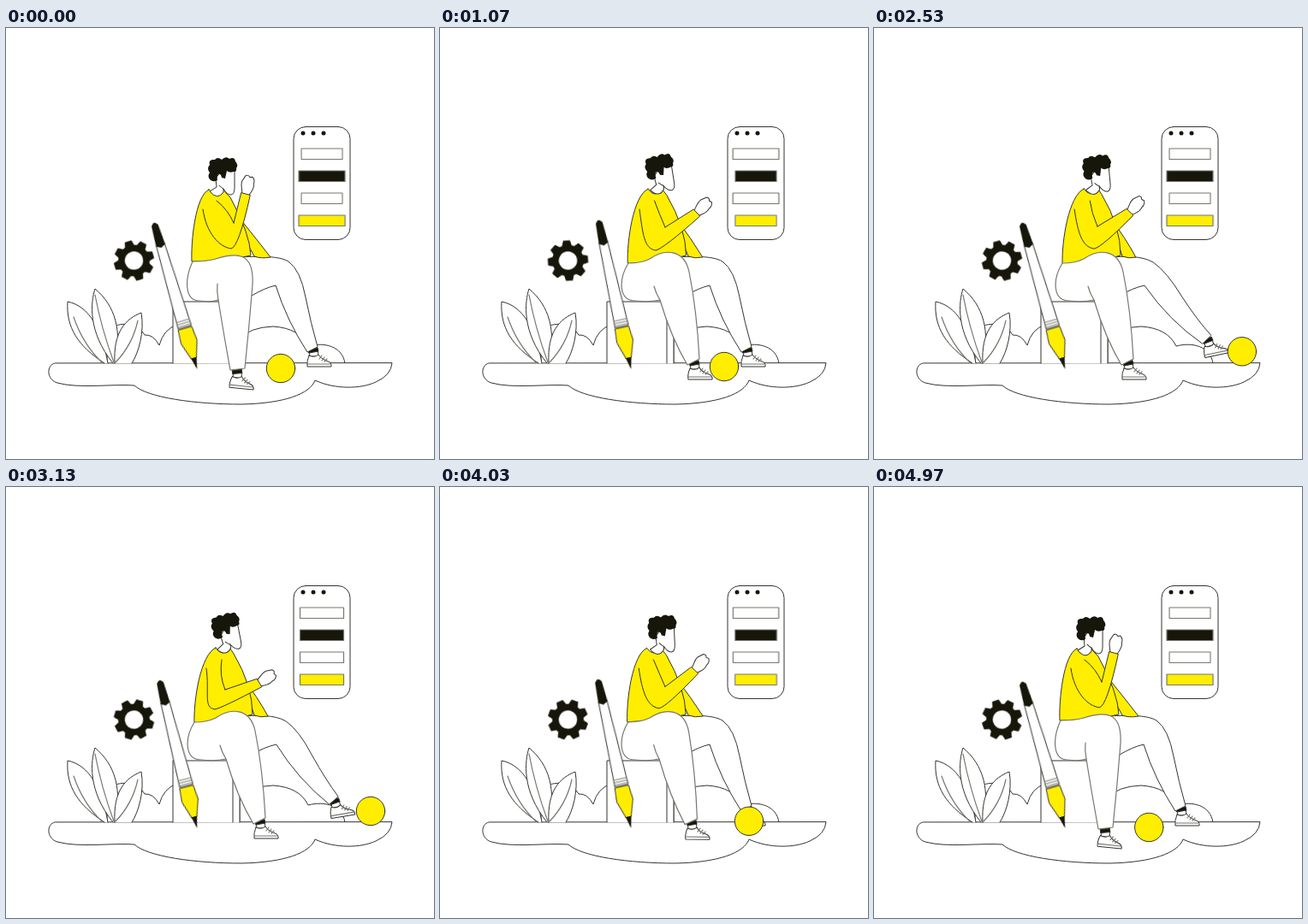
Write an HTML page that moves like this. It is 500 px wide and 504 px high and loops after 5.01 s.

```html
<!DOCTYPE html>
<html lang="en">
<head>
<meta charset="utf-8">
<title>Sitting figure with phone, pencil and ball</title>
<style>
  html, body { margin: 0; width: 100%; height: 100%; overflow: hidden; background: #fff; }
  svg { display: block; width: 500px; height: 504px; }
  .line { fill: #fff; stroke: #333331; stroke-width: 1; stroke-linejoin: round; stroke-linecap: round; }
  .soft { stroke: #77776f; stroke-width: 1.2; }
  .open { fill: none; }
  .yellow { fill: #ffee00; }
  .dark { fill: #17160a; }
  .bar { transform-origin: 369px 0; animation: swell 1252.5ms cubic-bezier(.37, 0, .63, 1) infinite alternate; }
  .bar.wide { animation-direction: alternate-reverse; }
  #pencil { animation: sway 1252.5ms cubic-bezier(.37, 0, .63, 1) infinite alternate; }
  #gear { animation: turn 5010ms linear infinite; }
  @keyframes swell { from { transform: scaleX(.94); } to { transform: scaleX(1.06); } }
  @keyframes sway {
    from { transform: translate(223px, 398px) rotate(-16.4deg); }
    to { transform: translate(223px, 398px) rotate(-12.1deg); }
  }
  @keyframes turn {
    from { transform: translate(149.5px, 272px) rotate(28deg); }
    to { transform: translate(149.5px, 272px) rotate(298deg); }
  }
</style>
</head>
<body>
<svg viewBox="0 0 500 504">
  <!-- bushes and ground -->
  <path class="line" d="M118 392V354C128 344 152 342 162 359Q172 358 179 371Q184 352 200 347V392"/>
  <path class="line" d="M273 392V364Q284 350 312 349Q343 351 353 372C372 367 393 372 396 392"/>
  <path class="line" d="M57 392C47 394 47 411 60 415C85 422 125 416 150 418C165 432 220 440 275 440C325 439 355 428 361 412C385 423 415 422 432 414Q450 406 451 392Z"/>

  <!-- plant -->
  <g class="line">
    <path d="M115 392C84 372 70 350 72 320C97 325 112 352 119 392"/>
    <path class="soft open" d="M79 338Q90 370 112 391"/>
    <path d="M125 392C95 355 99 320 104 305C128 325 136 355 127 392"/>
    <path class="soft open" d="M104 312Q111 350 126 391"/>
    <path d="M127 392C125 355 140 340 158 333C162 355 155 380 147 392"/>
    <path class="soft open" d="M154 342Q148 370 128 391"/>
  </g>

  <!-- seat -->
  <path class="line" d="M195 392V320H273V392M265 320V392"/>

  <g id="gear">
    <circle r="14.5" fill="none" stroke="#17160a" stroke-width="7.6"/>
  </g>

  <g id="pencil">
    <path class="line" d="M-5 -151L-8 -50H8L5 -151Z"/>
    <path class="dark" d="M-4 -174Q0 -181 4 -174L5.500 -150L0 -147L-5.500 -150Z"/>
    <path class="line soft open" d="M-7.500 -58H7.500M-7.800 -55H7.800M-8 -52H8"/>
    <path class="line yellow" d="M-8 -49H8L9.500 -32L3 -12H-3L-9.500 -32Z"/>
    <path class="dark" d="M-3.400 -13H3.400L0 1Z"/>
  </g>

  <!-- phone -->
  <rect class="line" x="336" y="115.500" width="66" height="132" rx="14"/>
  <g class="dark">
    <circle cx="347" cy="123" r="2.500"/>
    <circle cx="359" cy="123" r="2.500"/>
    <circle cx="371" cy="123" r="2.500"/>
  </g>
  <g class="line soft">
    <rect class="bar" x="343.500" y="141" width="51" height="12.500"/>
    <rect class="bar wide dark" x="343.500" y="167" width="51" height="12.500"/>
    <rect class="bar" x="343.500" y="193" width="51" height="12.500"/>
    <rect class="bar wide yellow" x="343.500" y="219" width="51" height="12.500"/>
  </g>

  <!-- figure -->
  <defs>
    <g id="shoe" class="line">
      <path d="M-5 -2L-4 7H6L5 -3Z"/>
      <path class="dark" d="M-6 -1L5 -3L6 1L-5 3Z"/>
      <path d="M-5 6Q-8 13 -7 19H21Q22 14 15 12Q9 10 6 5Q1 9 -5 6Z"/>
      <path class="soft open" d="M-7 16H20M7 10L10 6M10 12L13 8M13 13L16 10"/>
    </g>
  </defs>
  <use id="farShoe" href="#shoe"/>
  <path id="farLeg" class="line"/>
  <path id="farArm" class="line yellow"/>
  <path id="torso" class="line yellow"/>
  <use id="nearShoe" href="#shoe"/>
  <path id="nearLeg" class="line soft"/>
  <path id="crease" class="line soft open"/>
  <g id="head">
    <path class="line" d="M245 176L246 186L238 191Q247 202 254 192V188Q258 195 263 195Q267 194 267 187V167L254 165Z"/>
    <path class="line open" d="M249 184Q252 187 254 188"/>
    <path class="dark" d="M238 177Q235 173 238 169Q234 164 238 160Q236 153 244 154Q247 150 252 154Q257 149 261 153Q267 150 268 156Q272 160 269 164Q270 168 266 168Q261 170 258 167L256 176L252 175Q251 170 248 171Q246 173 247 178Q242 181 238 177Z"/>
  </g>
  <g id="hand"><path class="line" d="M-1 -4C5 -5 8 -8 14 -7L21 -4Q23 -1 20 1L21 4Q18 8 13 7C8 9 4 6 -1 4"/></g>
  <path id="arm" class="line yellow"/>
  <path id="armpit" class="line open"/>
  <circle id="ball" class="line yellow" r="16.700"/>
</svg>

<script>
const LOOP = 5010;
const POSES = [0, 1070, 1930, 3130, 3570, 4430];
const el = id => document.getElementById(id);
const set = (id, name, value) => el(id).setAttribute(name, value);

const gear = el('gear');
for (let i = 0; i < 8; i++) {
  const tooth = document.createElementNS('http://www.w3.org/2000/svg', 'path');
  tooth.setAttribute('d', 'M-6 -16L-4 -23.500H4L6 -16Z');
  tooth.setAttribute('class', 'dark');
  tooth.setAttribute('transform', `rotate(${i * 45})`);
  gear.append(tooth);
}

// Smooth closed curve through values at the given times
function spline(values, t, times = POSES) {
  const n = times.length;
  const time = i => times[(i + n) % n] + Math.floor(i / n) * LOOP;
  const val = i => values[(i + n) % n];
  const slope = i => (val(i + 1) - val(i - 1)) / (time(i + 1) - time(i - 1));
  let i = n - 1;
  while (times[i] > t) i--;
  const h = time(i + 1) - time(i), u = (t - time(i)) / h;
  const u2 = u * u, u3 = u2 * u;
  return (2 * u3 - 3 * u2 + 1) * val(i) + (u3 - 2 * u2 + u) * h * slope(i)
    + (3 * u2 - 2 * u3) * val(i + 1) + (u3 - u2) * h * slope(i + 1);
}

function ease(t, from, to) {
  const u = Math.min(1, Math.max(0, (t - from) / (to - from)));
  return (1 - Math.cos(Math.PI * u)) / 2;
}

// Blend two paths of the same structure
function morph(a, b, k) {
  const num = /-?\d+(\.\d+)?/g, ends = b.match(num);
  let i = 0;
  return a.replace(num, s => (+s + (ends[i++] - s) * k).toFixed(2));
}

const SHAPES = {
  torso: ['M237 189C221 196 216 250 217 273Q262 272 286 266Q285 240 262 198Q256 192 254 189Q246 200 237 189Z',
          'M245 188C227 196 219 250 220 276Q262 274 288 266Q288 232 266 195Q263 190 261 188Q253 200 245 188Z'],
  farArm: ['M275 225Q292 246 309 268Q298 270 290 267Q282 250 272 237Z',
           'M276 222Q294 246 306 268Q298 270 290 267Q286 252 280 240Z'],
  nearLeg: ['M218 273C208 295 209 319 226 319Q240 321 248 318Q253 350 262 400L279 398Q284 350 288 300C290 262 270 262 245 270Q235 273 218 273Z',
            'M220 275C208 295 209 319 228 319Q244 321 257 318Q270 362 289 394L303 387Q300 330 291 285C285 258 262 258 245 270Q235 275 220 275Z'],
  crease: ['M248 318Q246 308 247 299', 'M257 318Q252 310 250 302'],
  farLeg: ['M270 268C295 267 318 266 330 273Q344 283 350 315Q356 345 364 373L352 379Q328 342 315 301Q302 304 287 313Z',
           'M270 268C295 267 312 266 326 274Q342 285 360 314Q378 341 395 359L385 369Q345 342 316 301Q302 304 287 313Z']
};
const shape = (id, k) => set(id, 'd', morph(...SHAPES[id], k));

const ELBOW = [[263, 252, 268, 244, 248, 262], [258, 260, 257, 260, 261, 257]];
const CROOK = [[266, 263, 266, 256, 260, 265], [228, 233, 228, 237, 235, 232]];
const WRIST = [[280, 300, 302, 296, 299, 294], [194, 216, 203, 229, 222, 207]];
const HEAD = [[0, 7, 10, 8, 8, 6], [0, -3, -2, -3, -2, -1], [0, -9, 0, -11, -5, -1]];
const LEAN = [0, .75, 1, 1, .8, .35];
const BALL_TIMES = [0, 500, 1070, 1600, 1930, 2130, 2500, 2750, 3130, 3570, 3770, 4430];
const BALL_X = [321, 322, 332, 373, 397, 411, 429, 432, 426, 396, 383, 331];

function drawArm(t, lean) {
  const at = p => p.map(v => spline(v, t));
  const [ex, ey] = at(ELBOW), [cx, cy] = at(CROOK), [wx, wy] = at(WRIST);
  const sx = 230 + 4 * lean, sy = 212;
  const a = Math.atan2(wy - ey, wx - ex);
  const nx = -Math.sin(a) * 5.5, ny = Math.cos(a) * 5.5;
  set('arm', 'd', `M${sx} ${sy}C${sx + 4} ${sy + 28} ${ex - 14} ${ey - 2} ${ex} ${ey}`
    + `Q${ex + 9} ${ey - 2} ${wx + nx} ${wy + ny}L${wx - nx} ${wy - ny}L${cx} ${cy}`);
  set('armpit', 'd', `M${cx} ${cy}Q${cx - 7} ${cy - 16} ${246 + 6 * lean} 202`);
  set('hand', 'transform', `translate(${wx} ${wy}) rotate(${a * 180 / Math.PI - 4})`);
}

function draw(t) {
  const lean = spline(LEAN, t);
  const near = ease(t, 0, 1080) - ease(t, 3770, 5000);
  const far = ease(t, 1650, 2650) - ease(t, 2850, 3750);

  shape('torso', lean);
  shape('farArm', lean);
  shape('nearLeg', near);
  shape('crease', near);
  shape('farLeg', far);
  set('nearShoe', 'transform', `translate(${270 + 27 * near} ${402 - 10 * near}) rotate(${6 - 6 * near})`);
  set('farShoe', 'transform', `translate(${359 + 32 * far} ${377 - 12 * far}) rotate(${-12 * far})`);
  drawArm(t, lean);

  const [hx, hy, tilt] = HEAD.map(v => spline(v, t));
  set('head', 'transform', `translate(${hx} ${hy}) rotate(${tilt} 249 188)`);

  const bx = spline(BALL_X, t, BALL_TIMES);
  set('ball', 'cx', bx);
  set('ball', 'cy', 398 - (bx - 321) * .181);
}

let start;
function tick(now) {
  start ??= now;
  draw((now - start) % LOOP);
  requestAnimationFrame(tick);
}
draw(0);
requestAnimationFrame(tick);
</script>
</body>
</html>
```
